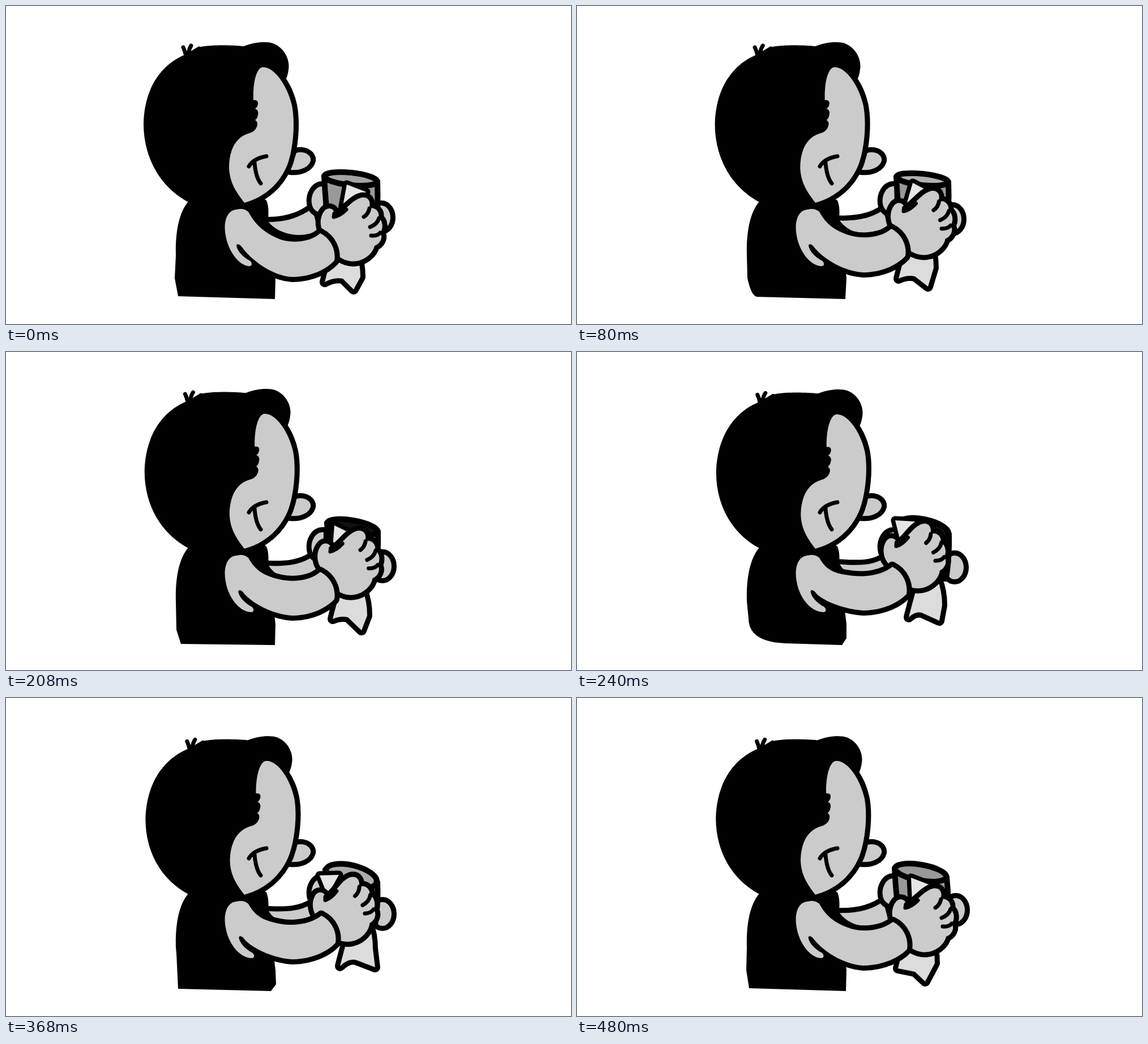
Animation of 998x561 px, one loop 560 ms. Source, as an HTML page:

```html
<!DOCTYPE html>
<html lang="en">
<head>
<meta charset="utf-8">
<title>Polishing a cup</title>
<style>
  html, body { margin: 0; width: 100%; height: 100%; overflow: hidden; background: #fff; }
  svg { display: block; width: 100%; height: 100%; }
  .pose {
    visibility: hidden;
    animation: show 560ms step-end infinite;
    animation-delay: calc(var(--i) * 80ms);
  }
  @keyframes show {
    0% { visibility: visible; }
    14.2857% { visibility: hidden; }
  }
  /* black outline sits outside the fill */
  .skin, .cloth, .tip {
    fill: #cbcbcb; stroke: #000; stroke-width: 18;
    stroke-linejoin: round; paint-order: stroke;
  }
  .cloth { fill: #dcdcdc; }
  .tip { fill: #e6e6e6; stroke-width: 15; }
  .line { fill: none; stroke: #000; stroke-width: 7; stroke-linecap: round; stroke-linejoin: round; }
  .cup { fill: #999; stroke: #000; stroke-width: 10; stroke-linejoin: round; }
</style>
</head>
<body>
<svg id="stage" viewBox="0 0 998 561"></svg>
<script>
// head: lean x, y | arm: dx, dy | hand: dx, dy, angle | far fingers: dx, dy
const poses = [
  { head: [0, 0], arm: [0, 0],   hand: [0, 0, 0],     far: [0, 0] },
  { head: [1, 0], arm: [0, -8],  hand: [0, -10, -2],  far: [0, 3] },
  { head: [3, 1], arm: [0, -13], hand: [-3, -20, -3], far: [2, 5] },
  { head: [5, 2], arm: [2, -22], hand: [-9, -30, -6], far: [4, 7] },
  { head: [6, 3], arm: [2, -17], hand: [-7, -16, -8], far: [2, 8] },
  { head: [3, 3], arm: [0, -5],  hand: [-4, -5, -4],  far: [4, 1] },
  { head: [4, 3], arm: [3, -6],  hand: [1, -2, 0],    far: [6, 1] }
];

// rim ellipse: cx, cy, rx, ry, tilt
const rims = [
  [609, 305, 47, 11, 6], [610, 306, 46, 10, 6], [612, 309, 45, 12, 10],
  [612, 312, 45, 17, 12], [610, 314, 46, 19, 14], [604, 308, 44, 14, 12],
  [607, 308, 46, 14, 10]
];
const insides = ["#a3a3a3", "#b0b0b0", "#111", "#111", "#adadad", "#999", "#999"];

const tips = [
  "602,315 636,328 594,358", "593,312 616,324 582,350", "580,306 607,319 577,345",
  "562,297 597,299 572,337", "554,313 588,312 568,348", "569,323 603,331 571,362",
  "590,317 624,330 592,360"
];

// cloth hem: left corner, notch, right corner, right side
const hems = [
  [563, 487, 595, 481, 614, 500, 626, 478], [568, 481, 597, 477, 620, 495, 630, 462],
  [577, 471, 604, 468, 628, 491, 638, 465], [586, 468, 609, 460, 640, 474, 645, 447],
  [590, 473, 618, 462, 652, 475, 648, 442], [571, 478, 602, 478, 628, 496, 636, 470],
  [567, 477, 597, 483, 615, 500, 632, 468]
];

const floors = [
  "L298,480 L304,512 L475,517", "L301,480 Q308,512 318,513 L474,517",
  "L301,490 L309,515 L475,517", "L303,470 Q303,512 370,514 L468,517 L476,505",
  "L301,450 L304,513 L345,514 L468,517 L477,505", "L301,480 L309,514 L460,517 L475,508",
  "L299,480 L304,512 L475,517"
];

const path = (cls, d) => `<path class="${cls}" d="${d}"/>`;

const body = floor => path("", `M322,345 C305,365 299,400 300,440 ${floor}
  L476,480 L463,375 Q465,355 460,343 L440,330 Z`);

function head([x, y]) {
  const a = -x / 237, d = 1 - y / 237;
  const lean = `matrix(1 0 ${a} ${d} ${-345 * a} ${345 * (1 - d)})`;
  return path("skin", "M513,259 C528,255 540,264 538,273 C535,284 520,291 502,289 Z") +
    `<g transform="${lean}">` +
    path("", `M322,346 C270,318 243,265 243,208 C244,150 270,105 316,86 L344,72
      C365,68 400,69 420,71 C440,63 460,62 472,66 C492,74 502,95 499,112
      Q498,123 493,132 L500,200 L470,330 L430,352 Z`) +
    path("line", "M318,88 Q316,79 313,73 M322,86 Q323,76 327,70 M328,83 L341,75") +
    path("skin", `M453,108 C442,110 436,135 437,166 Q446,165 445,173 Q444,179 440,181
      Q447,184 445,192 Q444,199 440,201 Q446,205 443,213 Q440,222 428,225
      C405,232 394,255 394,285 C395,313 408,330 421,347
      C455,338 483,315 497,280 C508,250 511,205 505,175 C497,140 473,106 453,108 Z`) +
    `</g>` + path("line", "M429,283 Q437,269 460,265 M439,276 Q441,302 450,313");
}

const backArm = dy => path("skin", `M464,${381 + dy * .3}
  C495,${381 + dy * .2} 520,${373 - dy * .2} 541,${357 - dy * .35}
  L551,396 C520,412 480,402 464,${381 + dy * .3} Z`);

function frontArm([x, y]) {
  const t = -y * .25;
  return path("skin", `M408,359 C388,360 384,385 388,405 C392,430 410,458 ${430 + t},459
    C${437 + t},458 ${434 + t},450 ${428 + t},448 C${418 + t},442 ${408 + t},432 ${407 + t},422
    C${409 + t},418 ${414 + t},421 ${418 + t},427 C440,${455 + y * .6} 475,${476 + y} 505,${478 + y}
    C540,${478 + y} ${566 + x},${464 + y} ${580 + x},${449 + y}
    C${583 + x},${432 + y} ${575 + x},${411 + y} ${555 + x},${401 + y}
    C540,${415 + y} 510,${420 + y} 485,${412 + y * .8}
    C455,${400 + y * .4} 440,385 428,363 C422,358 415,357 408,359 Z`);
}

function cloth([x1, y1, x2, y2, x3, y3, x4, y4]) {
  return path("cloth", `M${x1 + 12},${y1 - 45} Q${x1 + 5},${y1 - 20} ${x1},${y1}
    Q${(x1 + x2) / 2},${y2 - 3} ${x2},${y2} L${x3},${y3} L${x4},${y4}
    Q${x4},${y4 - 25} ${x4 - 8},${y4 - 45} Z`);
}

function cup([cx, cy, rx, ry, tilt], inside) {
  const drop = rx * Math.sin(tilt * Math.PI / 180);
  return path("cup", `M${cx - rx},${cy - drop} Q${cx - rx + 3},360 572,400
    L652,400 Q658,360 ${cx + rx},${cy + drop} Z`) +
    `<ellipse class="cup" style="fill:${inside}" cx="${cx}" cy="${cy}" rx="${rx}" ry="${ry}"
      transform="rotate(${tilt} ${cx} ${cy})"/>`;
}

const farFingers = ([x, y]) =>
  path("skin", "M561,318 C546,317 538,334 540,348 C541,358 548,364 560,366 Z") +
  `<ellipse class="skin" cx="${663 + x}" cy="${373 + y}" rx="16" ry="21"/>`;

const hand = ([x, y, angle]) =>
  `<g transform="translate(${x} ${y}) rotate(${angle} 580 430)">` +
  path("skin", `M560,398 C554,388 554,372 562,362 C568,354 578,357 580,364
    Q582,371 588,367 C602,357 614,341 628,338 C642,336 645,348 641,357
    C652,354 661,363 658,374 C667,380 666,394 661,400 C667,409 660,420 651,423
    C648,437 632,449 618,450 C605,452 594,446 588,442 Z`) +
  path("line", `M580,366 L579,372 Q590,370 601,359 M642,357 Q640,367 632,372
    M659,374 Q656,385 643,390 M661,400 Q656,406 645,405`) + `</g>`;

document.getElementById("stage").innerHTML = poses.map((p, i) =>
  `<g class="pose" style="--i:${i}">` +
  body(floors[i]) + head(p.head) + cloth(hems[i]) + backArm(p.arm[1]) +
  farFingers(p.far) + cup(rims[i], insides[i]) +
  `<polygon class="tip" points="${tips[i]}"/>` +
  hand(p.hand) + frontArm(p.arm) + `</g>`
).join("");
</script>
</body>
</html>
```
